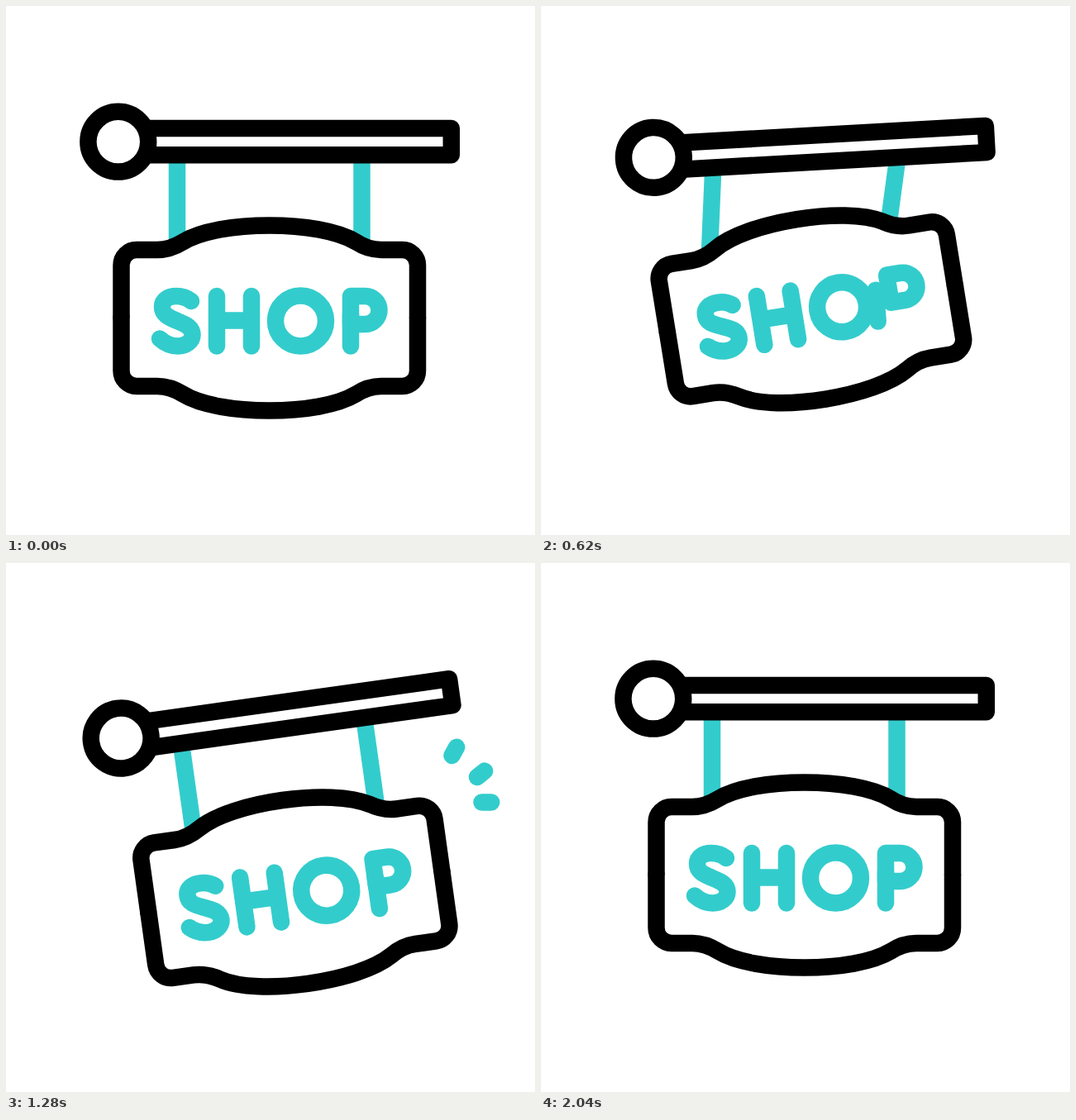
These frames come from a looping animation (640x640 px, 2.4 s). An HTML page:

```html
<!DOCTYPE html>
<html lang="en">
<head>
<meta charset="utf-8">
<title>Swinging shop sign</title>
<style>
  html, body { margin: 0; width: 100%; height: 100%; overflow: hidden; background: #fff; }
  svg { display: block; width: 100vw; height: 100vh; }
  .ink, .teal { fill: none; stroke-width: 20.5; stroke-linejoin: round; stroke-linecap: round; }
  .ink { stroke: #000; fill: #fff; }
  .teal { stroke: #33cccc; }
  .rod { stroke-linecap: butt; }
  #board * { vector-effect: non-scaling-stroke; }
</style>
</head>
<body>
<svg viewBox="0 0 640 640">
  <g id="arm">
    <path class="teal rod" id="rods"/>
    <path class="ink" d="M150 148.1H538.8V180.3H150Z"/>
    <circle class="ink" cx="135.8" cy="164.2" r="36.4"/>
    <g id="board">
      <!-- the lower half mirrors the upper one -->
      <path class="ink" id="half" d="M139.5 377.5V313.5A18.5 18.5 0 0 1 158 295H183C195 295 205 291 214 285.5C236 272 277 265.5 318.7 265.5S401 272 423.5 285.5C432 291 442 295 454 295H479.5A18.5 18.5 0 0 1 498 313.5V377.5"/>
      <use href="#half" transform="matrix(1 0 0 -1 0 755)"/>
      <g class="teal">
        <path d="M224 357C219 353 213 351 206 351C197 351 189 355 189 364C189 374 198 377 207 381S225.5 388 225.5 398C225.5 406 217 411.5 208 411.5C200 411.5 192 408 186 402.5"/>
        <path d="M255 351V411.5M297 351V411.5M255 380.5H297"/>
        <circle cx="356.5" cy="381" r="30.5"/>
        <path d="M417 351H434.5A17 17 0 0 1 434.5 385H417Z"/>
        <path id="tail" d="M417 373V411.5"/>
      </g>
    </g>
  </g>
  <path class="teal" id="rays"/>
</svg>
<script>
const LOOP = 2400, STEP = 20;
const PIVOT = [481, 164], CENTER = [318.5, 377.5], STEM = [417, 392];
const ROD_X = [207, 430.5];
const $ = id => document.getElementById(id);

const clamp = u => Math.min(1, Math.max(0, u));
const ease = u => u * u * (3 - 2 * u);
const ramp = (t, from, to) => ease(clamp((t - from) / (to - from)));

// Matrix of a turn about a point, followed by a shift
function pose([cx, cy], deg = 0, dx = 0, dy = 0) {
  const r = deg * Math.PI / 180, c = Math.cos(r), s = Math.sin(r);
  return [c, s, -s, c, cx + dx - c * cx + s * cy, cy + dy - s * cx - c * cy];
}

// Eased blend through the values, each reached at its own time
function blend(times, values, t) {
  return values.reduce((now, next, i) => {
    const e = i ? ramp(t, times[i - 1], times[i]) : 1;
    return now.map((v, n) => v + (next[n] - v) * e);
  });
}

const swing = [0, -18.5, 15.86, -8.2, 4.05, 0].map(deg => [deg]);
const swingTimes = [0, 410, 863, 1306, 1724, 2040];

// Points travel straight between poses, so the board shrinks a little on the way
const rest = pose(CENTER);
const board = [rest, pose(CENTER, -15.35, 47, 7.3), pose(CENTER, 5.7, -65, -53), rest];
const boardTimes = [0, 410, 863, 1150];

const tail = [rest, pose(STEM, -2, -17, 3), pose(STEM, 4.5, -18, -6), rest];
const tailTimes = [0, 410, 620, 863];

// Inner end and direction of each ray
const RAYS = [[539.5, 233, -61], [570, 259, -39], [575.5, 289.5, 0]];
const REACH = 47;

const setMatrix = (id, m) => $(id).setAttribute("transform", `matrix(${m.join(" ")})`);

function rodPath([a, b, c, d, e, f]) {
  const y = 286;
  return ROD_X.map(x => `M${x} 180L${a * x + c * y + e} ${b * x + d * y + f}`).join("");
}

function rayPath(t) {
  const tip = REACH * ramp(t, 1220, 1404), root = REACH * ramp(t, 1300, 1540);
  if (tip - root < 0.05) return "";
  return RAYS.map(([x, y, deg]) => {
    const r = deg * Math.PI / 180, c = Math.cos(r), s = Math.sin(r);
    return `M${x + c * root} ${y + s * root}L${x + c * tip} ${y + s * tip}`;
  }).join("");
}

function draw(t) {
  const boardNow = blend(boardTimes, board, t);
  setMatrix("arm", pose(PIVOT, blend(swingTimes, swing, t)[0]));
  setMatrix("board", boardNow);
  setMatrix("tail", blend(tailTimes, tail, t));
  $("rods").setAttribute("d", rodPath(boardNow));
  $("rays").setAttribute("d", rayPath(t));
}

const begin = performance.now();
function tick() {
  const t = (performance.now() - begin) % LOOP;
  draw(Math.floor(t / STEP) * STEP);
  requestAnimationFrame(tick);
}
tick();
</script>
</body>
</html>
```
